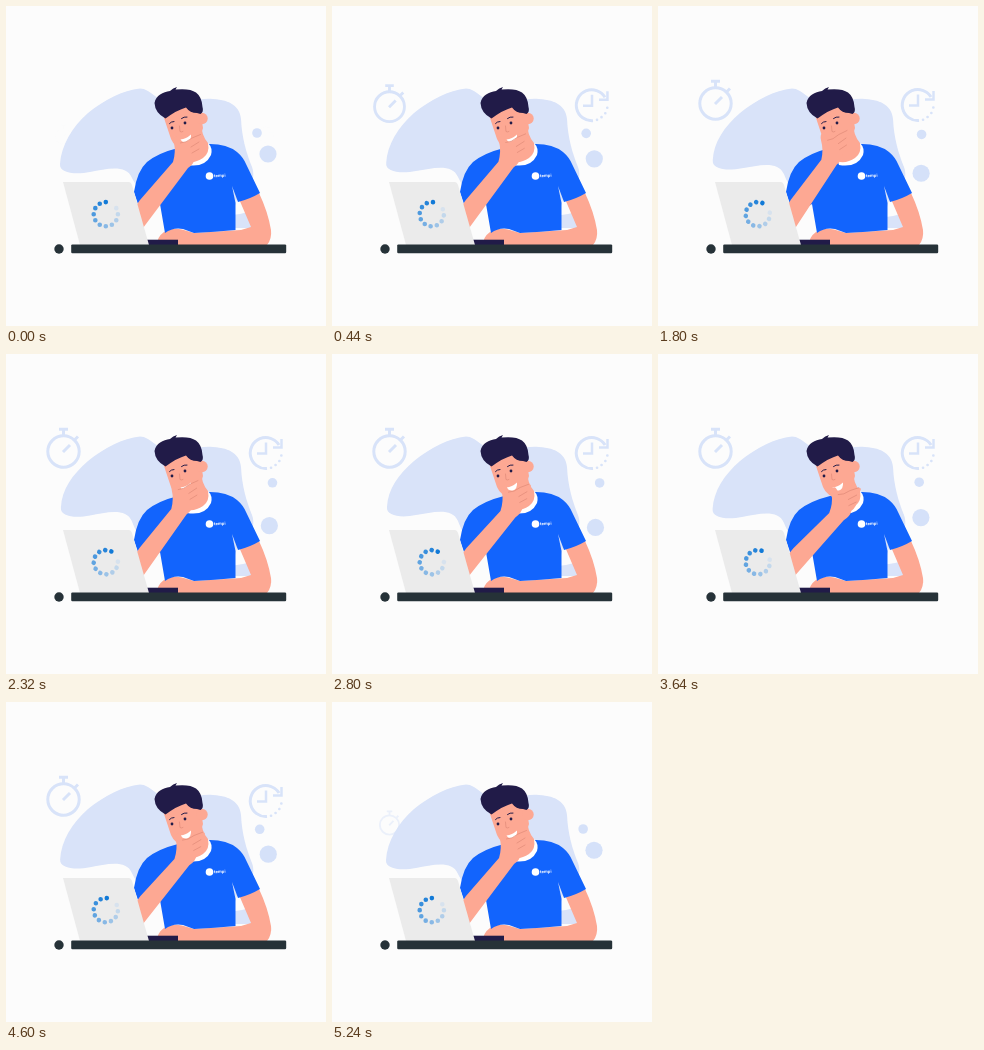
Write an HTML page that moves like this. It is 320x320 px and loops after 5.28 s.

```html
<!DOCTYPE html>
<html lang="en">
<head>
<meta charset="utf-8">
<title>Waiting at the laptop</title>
<style>
  html, body { margin: 0; width: 100%; height: 100%; overflow: hidden; background: #fcfcfc; }
  svg { display: block; width: 100vw; height: 100vh; }
  .icon { fill: none; stroke: #d8e3f9; stroke-width: 3; }
  .skin { fill: #fda893; }
  .hair { fill: #211b48; }
  .blue { fill: #1264fd; }
  .crease { fill: none; stroke: #e08a78; stroke-width: .7; stroke-linecap: round; }
  .brow { fill: none; stroke: #211b48; stroke-width: 1; stroke-linecap: round; }
</style>
</head>
<body>
<svg viewBox="0 0 320 320">
  <path id="blob" fill="#d9e3f9"/>
  <g id="bubbles" fill="#d5e1f9">
    <circle r="4.8"/>
    <circle r="8.6"/>
  </g>
  <g id="stopwatch" class="icon">
    <circle cx="57.5" cy="97.5" r="15.7"/>
    <path d="M53 75.3H62M57.5 75V82M68.5 86L72 82.5M57 98L64 91"/>
  </g>
  <g id="clock" class="icon">
    <path d="M273 91A15.5 15.5 0 1 0 261 114.5"/>
    <path d="M275.5 85V93.5H267M260 88.5V99.5H251" stroke-width="2.5"/>
    <path d="M265 113.7h.1M269.5 111h.1M273.3 107h.1M275.3 101.5h.1" stroke-linecap="round" stroke-width="2.6"/>
  </g>

  <!-- body -->
  <path class="skin" d="M233 193L253 187Q262 206 265 224Q266 233 261 239H151Q151 231 158 226Q166 221 176 223.5L188 227L235 224L245 221Z"/>
  <path class="blue" d="M128 186Q131 165 141 156Q152 147 172 142L204 138Q221 138 231 146Q237 151 240 158L254 187Q244 193 232 196L226 180L229.5 197V224Q209 226 188 227L177 223Q167 221 159 227L154 198L136 210Z"/>
  <path fill="#fff" d="M181 159Q199 162 205 149Q207 142 202 137L178 150Z"/>
  <path class="skin" d="M195 115Q195 129 202 137Q204 147 197 152Q190 157 182 156L172 140Z"/>
  <g fill="#fff">
    <circle cx="203.5" cy="170" r="3.8"/>
    <text x="208" y="171.3" font-family="Inter, Arial, sans-serif" font-size="4.2" font-weight="700" transform="rotate(-3 208 171)">tempi</text>
  </g>

  <!-- head -->
  <path class="skin" d="M157 109L165 133Q169 143 180 143Q192 140 197 122L193 98L171 99Z"/>
  <circle class="skin" cx="196" cy="112.5" r="5.7"/>
  <path class="hair" d="M148.5 97C150 89 157 86 164 85Q167 82 171 81L169.5 83.5Q184 82 190 86.5Q196 91 196.5 101Q198 106 194.5 108L191 107Q184 107 180 101.5Q171 104 159.5 112.5Q149 107 148.5 97Z"/>
  <path class="brow" d="M163.5 117.5Q165 115.5 168 115.5M175.5 112.5Q178 110.5 181 111"/>
  <g class="hair">
    <circle cx="166" cy="122" r="1.4"/>
    <circle cx="179" cy="117" r="1.4"/>
  </g>
  <path class="crease" d="M173.5 120L174 125.5Q175.5 126.5 177 125.5"/>
  <path fill="#fff" d="M174.5 133.5Q180 133 185 128.5Q185.5 135 181 136.5Q176.500 137 174.5 133.5Z"/>

  <!-- thinking arm -->
  <g id="arm">
    <path class="skin" d="M120 214L134 194L167 156Q170 146 168 137Q167 130 170 130Q173 130 174.5 137Q180 137 186 132L194.5 128.5Q198 128.5 196 132L193 136Q195 138 193.5 142Q194 148 189 152Q188 158 182 162L137 222Z"/>
    <path class="crease" d="M174.5 137Q180 137 186 132L194.5 128.5M193 136L185 141M193 143L186 147"/>
  </g>

  <!-- desk -->
  <path class="hair" d="M140 233.7H172V239.5H140Z"/>
  <path fill="#ebebeb" d="M57 176H123Q125 176 126 179L143 239H74Z"/>
  <g id="spinner"></g>
  <rect x="65.2" y="238.4" width="215" height="8.8" rx="1.2" fill="#263238"/>
  <circle cx="53" cy="243" r="4.7" fill="#263238"/>
</svg>
<script>
const LOOP = 5280;
const $ = id => document.getElementById(id);
const clamp = x => Math.max(0, Math.min(1, x));
const smooth = x => x * x * (3 - 2 * x);
const [small, big] = $('bubbles').children;

for (let i = 0; i < 11; i++) {
  const a = -Math.PI / 2 - i * Math.PI / 6;
  const k = i / 10;
  const mix = (from, to) => Math.round(from + (to - from) * k);
  $('spinner').innerHTML += `<circle cx="${99.8 + 12.1 * Math.cos(a)}" cy="${208.2 + 12.1 * Math.sin(a)}" r="2.3"
    fill="rgb(${mix(18, 215)},${mix(122, 226)},${mix(215, 238)})"/>`;
}

// Slow drift out and back, as [time, amount]
const DRIFT = [[0, 0], [920, .39], [1800, .74], [2600, 1], [2800, .98], [3640, .6], [4600, .16], [LOOP, 0]];
function drift(t) {
  const i = DRIFT.findIndex(p => p[0] > t);
  const [t0, a] = DRIFT[i - 1], [t1, b] = DRIFT[i];
  return a + (b - a) * (t - t0) / (t1 - t0);
}

// Hand: up, down, back to the chin in equal thirds
function handAngle(t) {
  const stops = [0, -3.7, 4.5, 0];
  const u = t / LOOP * 3, i = Math.floor(u);
  return stops[i] + (stops[i + 1] - stops[i]) * smooth(u - i);
}

// The lower edges shift while the top stays still
function blobPath(d) {
  const x = 54 + d, up = y => y - 5 * d, down = y => y + 3 * d;
  return `M${x} ${up(158)}C${x + 1} ${up(140)} 66 121 82 107C98 94 117 84 134 82.5
    C145 83 148 93 160 95C177 97 190 92 207 93C225 94 234 101 235 113
    C236 132 240 146 246 161C250 172 245 185 232 190
    L226 ${down(209)}Q236 ${down(208)} 246 ${down(205)}V222H200L160 196
    C140 190 132 184 126 ${up(172)}C120 ${up(158)} 101 ${up(163)} 84 ${up(166)}
    C69 ${up(169)} ${x - 1} ${up(167)} ${x} ${up(158)}Z`;
}

function pop(id, x, y, rise, t, inLength, outStart, outLength) {
  const shown = 1 - (1 - clamp(t / inLength)) ** 2 - clamp((t - outStart) / outLength) ** 2;
  const e = clamp(shown);
  $(id).setAttribute('transform',
    `translate(${x} ${y + rise * (1 - e)}) scale(${.5 + .5 * e}) translate(${-x} ${-y})`);
  $(id).setAttribute('opacity', Math.min(1, 2 * e));
}

function place(circle, x, y) {
  circle.setAttribute('cx', x);
  circle.setAttribute('cy', y);
}

function draw(now) {
  const t = now % LOOP, d = drift(t);
  place(small, 251 + 17 * d, 127 + 2 * d);
  place(big, 262 + 1.5 * d, 148 + 26 * d);
  $('blob').setAttribute('d', blobPath(d));
  $('spinner').setAttribute('transform', `rotate(${30 * d} 99.8 208.2)`);
  $('arm').setAttribute('transform', `rotate(${handAngle(t)} 130 212)`);
  pop('stopwatch', 57.5, 97.5, 33, t, 640, 4960, 320);
  pop('clock', 260, 99, 30, t, 480, 4680, 400);
  requestAnimationFrame(() => draw(performance.now()));
}
draw(0);
</script>
</body>
</html>
```
